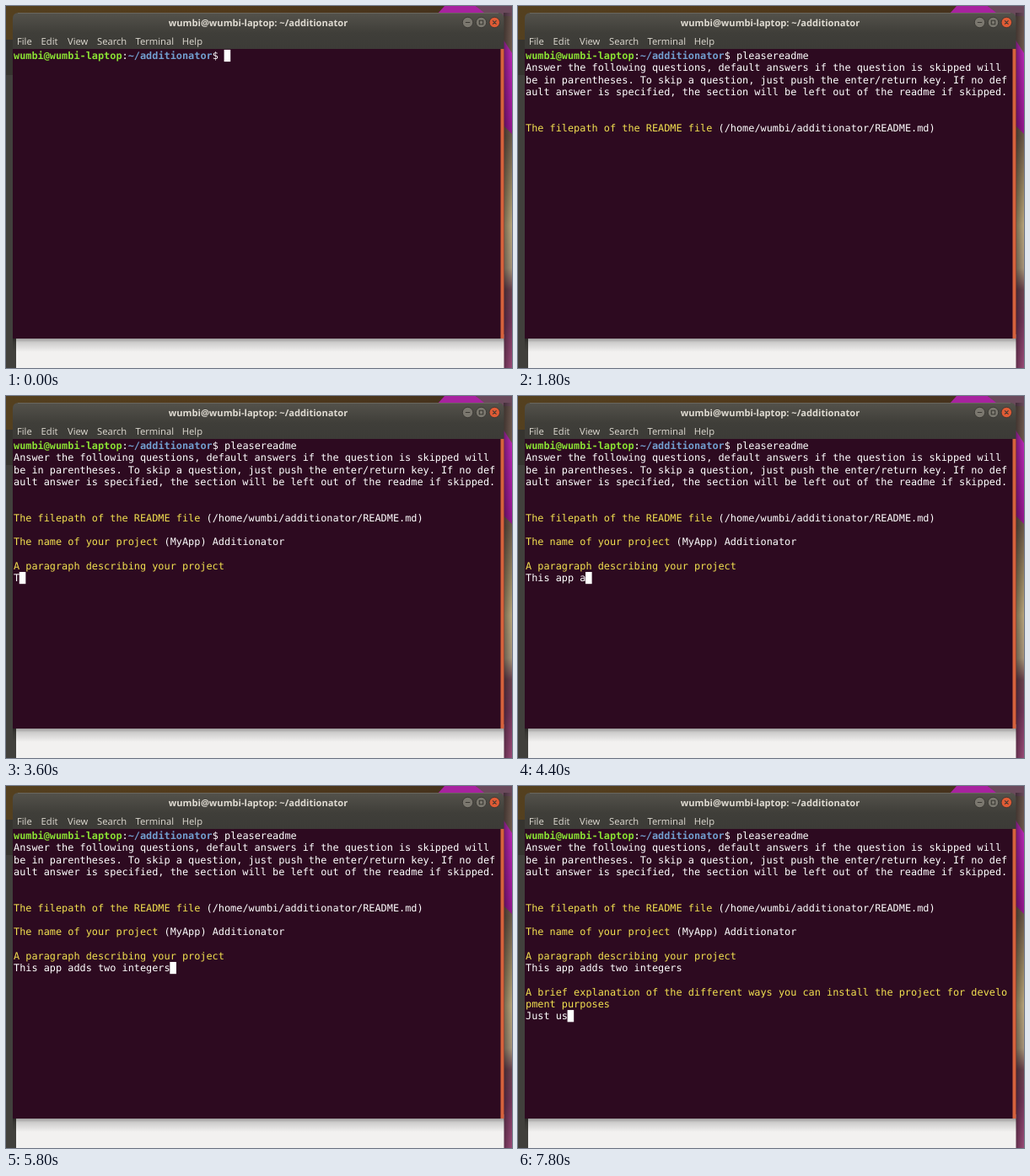
An HTML page that plays this animation: 600 px wide and 430 px high, repeating every 8 s.

```html
<!DOCTYPE html>
<html lang="en">
<head>
<meta charset="utf-8">
<title>Terminal session</title>
<style>
  html, body { margin: 0; width: 100%; height: 100%; overflow: hidden; background: #3b3a36; }
  svg { display: block; width: 600px; height: 430px; }
  text { white-space: pre; text-rendering: geometricPrecision; }
  .ui { font: 11.2px "Open Sans", "Noto Sans", sans-serif; fill: #dfdbd2; }
  .title { font-weight: 700; font-size: 11.1px; text-anchor: middle; }
  .mono { font: 11.864px "DejaVu Sans Mono", monospace; fill: #fff; }
  .mono .yellow { fill: #f2e150; }
  .mono .green { fill: #8ae234; font-weight: 700; }
  .mono .blue { fill: #729fcf; font-weight: 700; }
</style>
</head>
<body>
<svg viewBox="0 0 600 430" xmlns="http://www.w3.org/2000/svg">
  <defs>
    <linearGradient id="top">
      <stop offset="0" stop-color="#54401f"/>
      <stop offset=".4" stop-color="#523a1b"/>
      <stop offset="1" stop-color="#42301d"/>
    </linearGradient>
    <linearGradient id="side" x2="0" y2="1">
      <stop offset="0" stop-color="#66524b"/>
      <stop offset=".12" stop-color="#705a50"/>
      <stop offset=".35" stop-color="#6d5a4a"/>
      <stop offset=".5" stop-color="#9a8763"/>
      <stop offset=".6" stop-color="#b9a67c"/>
      <stop offset=".72" stop-color="#a8957a"/>
      <stop offset=".78" stop-color="#6b4350"/>
      <stop offset=".87" stop-color="#75385c"/>
      <stop offset="1" stop-color="#9a4a78"/>
    </linearGradient>
    <linearGradient id="petal" x2="0" y2="1">
      <stop offset="0" stop-color="#c02bbd"/>
      <stop offset="1" stop-color="#95188f"/>
    </linearGradient>
    <linearGradient id="bar" x2="0" y2="1">
      <stop offset="0" stop-color="#54524b"/>
      <stop offset=".55" stop-color="#3f3e39"/>
      <stop offset="1" stop-color="#3c3b37"/>
    </linearGradient>
    <linearGradient id="shade" x2="0" y2="1">
      <stop offset="0" stop-opacity=".36"/>
      <stop offset=".3" stop-opacity=".15"/>
      <stop offset="1" stop-opacity="0"/>
    </linearGradient>
    <linearGradient id="shadeRight">
      <stop offset="0" stop-opacity=".4"/>
      <stop offset="1" stop-opacity="0"/>
    </linearGradient>
  </defs>

  <rect width="600" height="430" fill="#41403c"/>
  <rect width="600" height="40" fill="url(#top)"/>
  <rect y="40" width="9" height="42" fill="#36342f"/>
  <rect x="584" y="6" width="16" height="424" fill="url(#side)"/>
  <path d="M511 10L520 0H557L572 10z" fill="#a8239f"/>
  <path d="M557 0H600V12H572z" fill="#6b4a5c"/>
  <path d="M586 34L600 56V152L586 138z" fill="url(#petal)"/>
  <rect x="590" y="8" width="10" height="422" fill="url(#shadeRight)"/>
  <rect x="12" y="390" width="578.5" height="40" fill="#f2f1f0"/>
  <rect x="8" y="395" width="583" height="16" fill="url(#shade)"/>

  <path d="M8 52V15q0-7 7-7H583.5q7 0 7 7V52z" fill="url(#bar)"/>
  <path d="M14 8.5H584" stroke="#69665d"/>
  <rect x="8" y="51" width="582.5" height="344" fill="#2d0a20"/>
  <rect x="586.5" y="51" width="4" height="344" fill="#d6623c"/>

  <g fill="#7b786f" stroke="#33322e" stroke-width=".8">
    <circle cx="547.5" cy="19.5" r="6.2"/>
    <circle cx="563.5" cy="19.5" r="6.2"/>
    <circle cx="579.3" cy="19.5" r="6.2" fill="#df5b35"/>
  </g>
  <path d="M544.8 19.5h5.4M561.3 17.3h4.4v4.4h-4.4zM577.1 17.3l4.4 4.4m0-4.4l-4.4 4.4"
        fill="none" stroke="#3a3833" stroke-width="1.1"/>

  <text class="ui title" x="299" y="23.7">wumbi@wumbi-laptop: ~/additionator</text>
  <g class="ui">
    <text x="13" y="46">File</text>
    <text x="41.6" y="46">Edit</text>
    <text x="73" y="46">View</text>
    <text x="108" y="46">Search</text>
    <text x="153.6" y="46">Terminal</text>
    <text x="208.8" y="46">Help</text>
  </g>
  <g id="screen" class="mono"></g>
  <rect id="cursor" width="7.6" height="14.2" fill="#fff"/>
</svg>
<script>
const LOOP = 8000, TICK = 200, BLINK = 600;
const CELL_W = 7.143, CELL_H = 14.28, LEFT = 9, TOP = 52;
const screen = document.getElementById("screen");
const cursor = document.getElementById("cursor");

const steps = [];
const enters = [1200, 2000, 3400, 6200];

// Text typed between two times; equal times make it appear at once.
function type(from, to, row, col, text, style = "") {
  const node = document.createElementNS("http://www.w3.org/2000/svg", "text");
  node.setAttribute("class", style);
  node.setAttribute("x", LEFT + col * CELL_W);
  node.setAttribute("y", TOP + row * CELL_H + 11);
  screen.append(node);
  steps.push({ from, to, row, col, text, node });
}

// A line of [text, style] runs printed in one go.
function print(at, row, ...runs) {
  let col = 0;
  for (const [text, style] of runs) {
    type(at, at, row, col, text, style);
    col += text.length;
  }
}

print(0, 0, ["wumbi@wumbi-laptop", "green"], [":"], ["~/additionator", "blue"], ["$ "]);
type(0, 1000, 0, 35, "pleasereadme");
print(1200, 1, [""]);
print(1400, 1, ["Answer the following questions, default answers if the question is skipped will"]);
print(1400, 2, ["be in parentheses. To skip a question, just push the enter/return key. If no def"]);
print(1400, 3, ["ault answer is specified, the section will be left out of the readme if skipped."]);
print(1400, 6, ["The filepath of the README file ", "yellow"], ["(/home/wumbi/additionator/README.md) "]);
print(2000, 8, ["The name of your project ", "yellow"], ["(MyApp) "]);
type(2200, 3160, 8, 33, "Additionator");
print(3400, 10, ["A paragraph describing your project", "yellow"]);
print(3400, 11, [""]);
type(3525, 5800, 11, 0, "This app adds two integers");
print(6200, 13, ["A brief explanation of the different ways you can install the project for develo", "yellow"]);
print(6200, 14, ["pment purposes", "yellow"]);
print(6200, 15, [""]);
type(7100, 7800, 15, 0, "Just us");

function render(time) {
  const t = Math.floor((time % LOOP) / TICK) * TICK;
  let lastKey = Math.max(0, ...enters.filter(e => e <= t));
  for (const { from, to, row, col, text, node } of steps) {
    const active = t >= from;
    const part = !active ? 0 : to > from ? Math.min(1, (t - from) / (to - from)) : 1;
    const count = Math.round(part * text.length);
    node.textContent = text.slice(0, count);
    if (!active) continue;
    if (to > from) lastKey = Math.max(lastKey, Math.min(t, to));
    cursor.setAttribute("x", LEFT + (col + count) * CELL_W - .4);
    cursor.setAttribute("y", TOP + row * CELL_H - .1);
  }
  const lit = Math.floor((t - lastKey) / BLINK) % 2 === 0;
  cursor.setAttribute("visibility", lit ? "visible" : "hidden");
}

const start = performance.now();
function frame() {
  render(performance.now() - start);
  requestAnimationFrame(frame);
}
frame();
</script>
</body>
</html>
```
